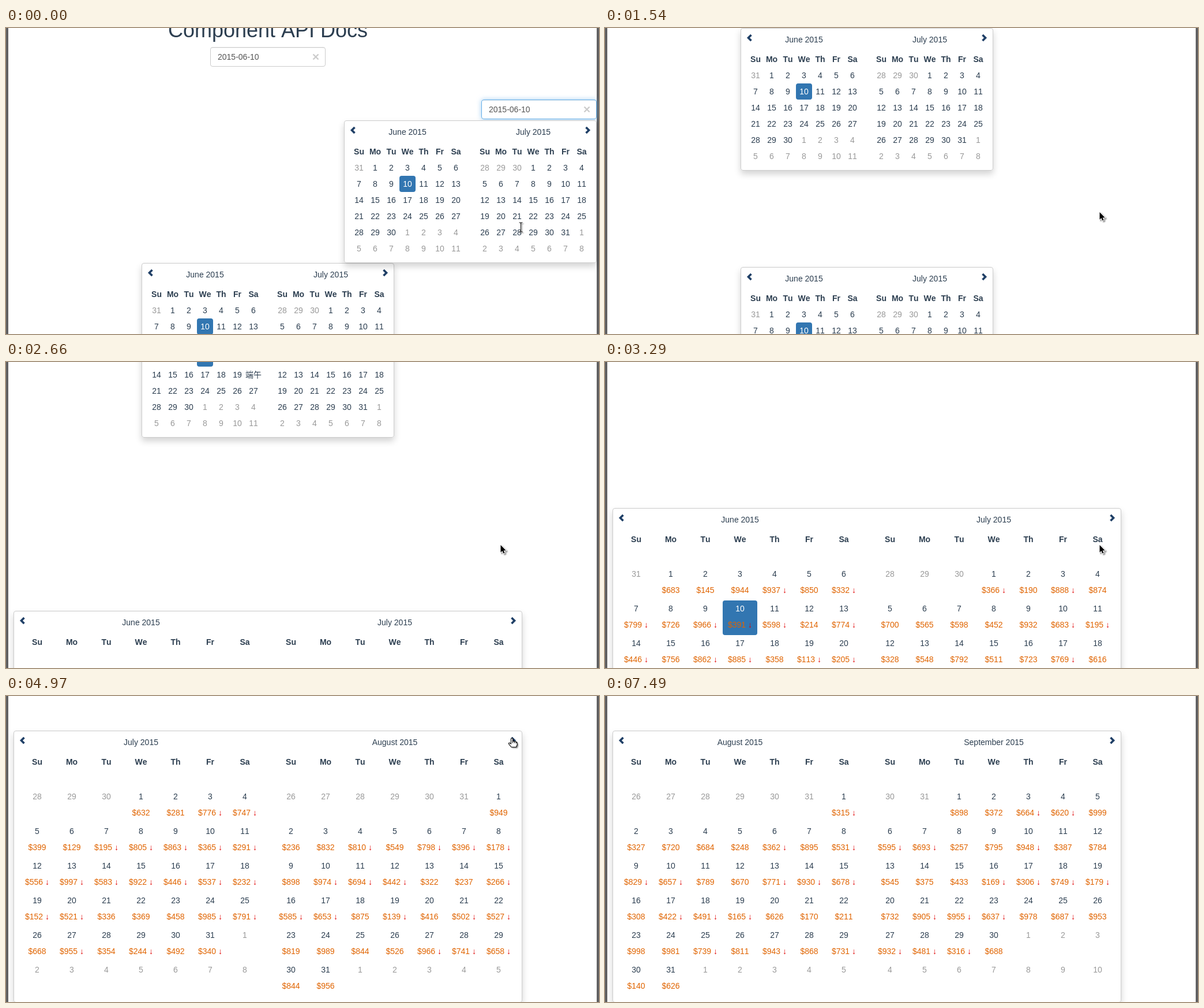
Animation of 1028x530 px, one loop 7700 ms. Source, as an HTML page with a canvas:

```html
<!DOCTYPE html>
<html lang="en">
<head>
<meta charset="utf-8">
<title>Date picker demo</title>
<style>
html, body { margin: 0; width: 100%; height: 100%; overflow: hidden; background: #fff; }
canvas { display: block; }
</style>
</head>
<body>
<canvas id="stage" width="1028" height="530"></canvas>
<script>
const W = 1028, H = 530, LOOP = 7700, STEP = 70;
const ctx = document.getElementById('stage').getContext('2d');
const FAMILY = '"Liberation Sans", Arial, "Noto Sans CJK SC", "Noto Sans CJK", sans-serif';
const INK = '#2c3e50', MUTED = '#999', BLUE = '#3276b1', ORANGE = '#e06400';
const RED = '#e00000', NAVY = '#1f3f66';
const DAYS = ['Su', 'Mo', 'Tu', 'We', 'Th', 'Fr', 'Sa'];
const MONTHS = ['June', 'July', 'August', 'September'];
const JUNE = 5, NOTCH = 53;

// A month of random prices, about half of them falling.
function prices(seed) {
  let s = seed * 7919;
  const rand = () => (s = (s * 16807) % 2147483647) / 2147483647;
  rand();
  return Array.from({ length: 31 }, () => ({
    value: '$' + (100 + Math.floor(rand() * 901)),
    falling: rand() < 0.5
  }));
}

const june = prices(1), july = prices(2), august = prices(3);

// Two months shown from a given time on; fresh prices arrive one step after a click.
const PAGES = [
  { from: 0, month: 0, prices: [june, july] },
  { from: 4900, month: 1, prices: [july, null] },
  { from: 4970, month: 1, prices: [prices(4), august] },
  { from: 6090, month: 2, prices: [august, null] },
  { from: 6160, month: 2, prices: [prices(5), prices(6)] }
];

// Wheel bursts: start, end, distance.
const WHEEL = [
  [0, 70, 36], [420, 1190, 7 * NOTCH], [1680, 2660, 10 * NOTCH], [2730, 3080, 3 * NOTCH],
  [3150, 3290, 19], [3290, 3430, 87], [3500, 3780, 2 * NOTCH]
];

// Pointer strokes: start, end, dx, dy.
const STROKES = [
  [420, 1190, -35, -24], [1680, 1890, 0, -2], [3710, 4130, 22, -185],
  [4130, 4620, -2, -59], [6300, 6440, 9, 4], [6510, 7350, -341, -96]
];

// Sum of one column over all moves, each running linearly.
function travel(moves, t, column) {
  return Math.round(moves.reduce((sum, m) => {
    const p = Math.min(1, Math.max(0, (t - m[0]) / (m[1] - m[0])));
    return sum + p * m[column];
  }, 0));
}

function text(s, x, y, color = INK, align = 'center', font = '14px') {
  ctx.font = font + ' ' + FAMILY;
  ctx.fontKerning = 'none';
  ctx.fillStyle = color;
  ctx.textAlign = align;
  ctx.fillText(s, x, y);
}

function box(x, y, w, h, r) {
  ctx.beginPath();
  ctx.roundRect(x, y, w, h, r);
}

function shadow(color, blur, dy = 0) {
  ctx.shadowColor = color;
  ctx.shadowBlur = blur;
  ctx.shadowOffsetY = dy;
}

function panel(x, y, w, h, border, glow) {
  ctx.save();
  shadow(...glow);
  ctx.fillStyle = '#fff';
  box(x, y, w, h, 4);
  ctx.fill();
  ctx.restore();
  ctx.strokeStyle = border;
  ctx.lineWidth = 1;
  box(x + 0.5, y + 0.5, w - 1, h - 1, 3.5);
  ctx.stroke();
}

function lines(points, color, width) {
  ctx.beginPath();
  points.forEach(([x, y]) => ctx.lineTo(x, y));
  ctx.strokeStyle = color;
  ctx.lineWidth = width;
  ctx.stroke();
}

function input(x, y, focused) {
  if (focused) panel(x, y, 200, 34, '#66afe9', ['rgba(102,175,233,.6)', 8]);
  else panel(x, y, 200, 34, '#ccc', ['transparent', 0]);
  ctx.fillStyle = 'rgba(0,0,0,.06)';
  ctx.fillRect(x + 2, y + 1, 196, 1);
  text('2015-06-10', x + 13, y + 22, '#555', 'left');
  const cx = x + 183, cy = y + 17, r = 4.5;
  lines([[cx - r, cy - r], [cx + r, cy + r]], '#ccc', 2.4);
  lines([[cx - r, cy + r], [cx + r, cy - r]], '#ccc', 2.4);
}

function chevron(x, y, dir) {
  lines([[x - 2.5 * dir, y - 5], [x + 2.5 * dir, y], [x - 2.5 * dir, y + 5]], NAVY, 3.6);
}

function price({ value, falling }, x, y) {
  if (!falling) return text(value, x, y, ORANGE);
  ctx.font = '14px ' + FAMILY;
  const left = x - ctx.measureText(value + ' ↓').width / 2;
  const gap = ctx.measureText(value + ' ').width;
  text(value, left, y, ORANGE, 'left');
  text('↓', left + gap, y, RED, 'left');
}

function month(m, cx, y, cell, list, holiday) {
  const first = new Date(2015, JUNE + m, 1).getDay();
  const length = new Date(2015, JUNE + m + 1, 0).getDate();
  const x0 = cx - 3 * cell;
  text(MONTHS[m] + ' 2015', cx, y + 25);
  DAYS.forEach((d, i) => text(d, x0 + i * cell, y + 59, INK, 'center', 'bold 14px'));
  for (let i = 0; i < 42; i++) {
    const n = i - first + 1, inside = n > 0 && n <= length;
    const x = x0 + (i % 7) * cell;
    const top = y + 40 + cell + Math.floor(i / 7) * cell;
    const selected = m === 0 && n === 10;
    if (selected) {
      ctx.fillStyle = BLUE;
      box(x - cell / 2, top, cell, cell, 4);
      ctx.fill();
    }
    const day = new Date(2015, JUNE + m, n).getDate();
    const label = holiday && m === 0 && n === 20 ? '端午' : day;
    text(label, x, top + 19, selected ? '#fff' : inside ? INK : MUTED);
    if (inside && list) price(list[n - 1], x, top + 47);
  }
}

function calendar(x, y, { page, holiday } = {}) {
  const cell = page ? 60 : 28;
  const w = page ? 882 : 438, h = 7 * cell + 51;
  if (y > H || y + h < -20) return;
  panel(x, y, w, h, '#ccc', ['rgba(0,0,0,.175)', 12, 6]);
  chevron(x + 16, y + 17, -1);
  chevron(x + w - 16, y + 17, 1);
  const first = page ? page.month : 0;
  const [left, right] = page ? page.prices : [];
  month(first, x + (page ? 221 : 110), y, cell, left, holiday);
  month(first + 1, x + (page ? 661 : 328), y, cell, right, holiday);
}

const ARROW = new Path2D('M0 0V12.8L2.9 10.2L4.9 14.6L7 13.7L5.1 9.4H9.2Z');
const HAND = new Path2D('M-2 1Q-.5 -1 1 1V5.5Q3 4.4 4 5.8Q6 5 6.8 6.6Q8.7 6.4 8.7 8.4V11.5L7 15.5H-1.5L-6 9.8Q-6.4 7.6 -4.4 8.2L-2 10Z');
const FINGERS = new Path2D('M1 5.5V8.5M4 5.8V8.6M6.8 6.6V9');
const BEAM = new Path2D('M-3 -7.5H-1L0 -6.5L1 -7.5H3M0 -6.5V7.5M-3 8.5H-1L0 7.5L1 8.5H3');

function pointer(t) {
  ctx.save();
  ctx.translate(892.5 + travel(STROKES, t, 2), 343 + travel(STROKES, t, 3));
  ctx.lineJoin = 'round';
  ctx.lineWidth = 1.2;
  ctx.shadowOffsetX = 2;
  shadow('rgba(0,0,0,.45)', 2, 2);
  if (t < 280) {
    ctx.translate(0, 1.5);
    ctx.strokeStyle = '#222';
    ctx.stroke(BEAM);
  } else if (t >= 4480 && t < 6440) {
    ctx.fillStyle = '#fff';
    ctx.fill(HAND);
    ctx.shadowColor = 'transparent';
    ctx.strokeStyle = '#111';
    ctx.stroke(HAND);
    ctx.stroke(FINGERS);
  } else {
    ctx.strokeStyle = '#fff';
    ctx.lineWidth = 2;
    ctx.stroke(ARROW);
    ctx.shadowColor = 'transparent';
    ctx.fillStyle = '#000';
    ctx.fill(ARROW);
  }
  ctx.restore();
}

function draw(t) {
  const scroll = travel(WHEEL, t, 2);
  ctx.fillStyle = '#fff';
  ctx.fillRect(0, 0, W, H);
  ctx.fillStyle = '#606062';
  ctx.fillRect(0, 0, 4, H);
  ctx.fillRect(1024, 0, 4, H);

  text('Component API Docs', 454, 16 - scroll, INK, 'center', '36px');
  input(354, 33 - scroll, false);
  input(824, 124 - scroll, t < 1540);
  calendar(235, 407 - scroll);
  calendar(235, 821 - scroll, { holiday: true });
  calendar(13, 1368 - scroll, { page: PAGES.filter(p => p.from <= t).pop() });
  if (t < 1540) calendar(586, 160 - scroll);
  if (t < 7350) pointer(t);
}

function tick() {
  const t = performance.now() % LOOP;
  draw(Math.floor(t / STEP) * STEP);
  requestAnimationFrame(tick);
}
tick();
</script>
</body>
</html>
```
